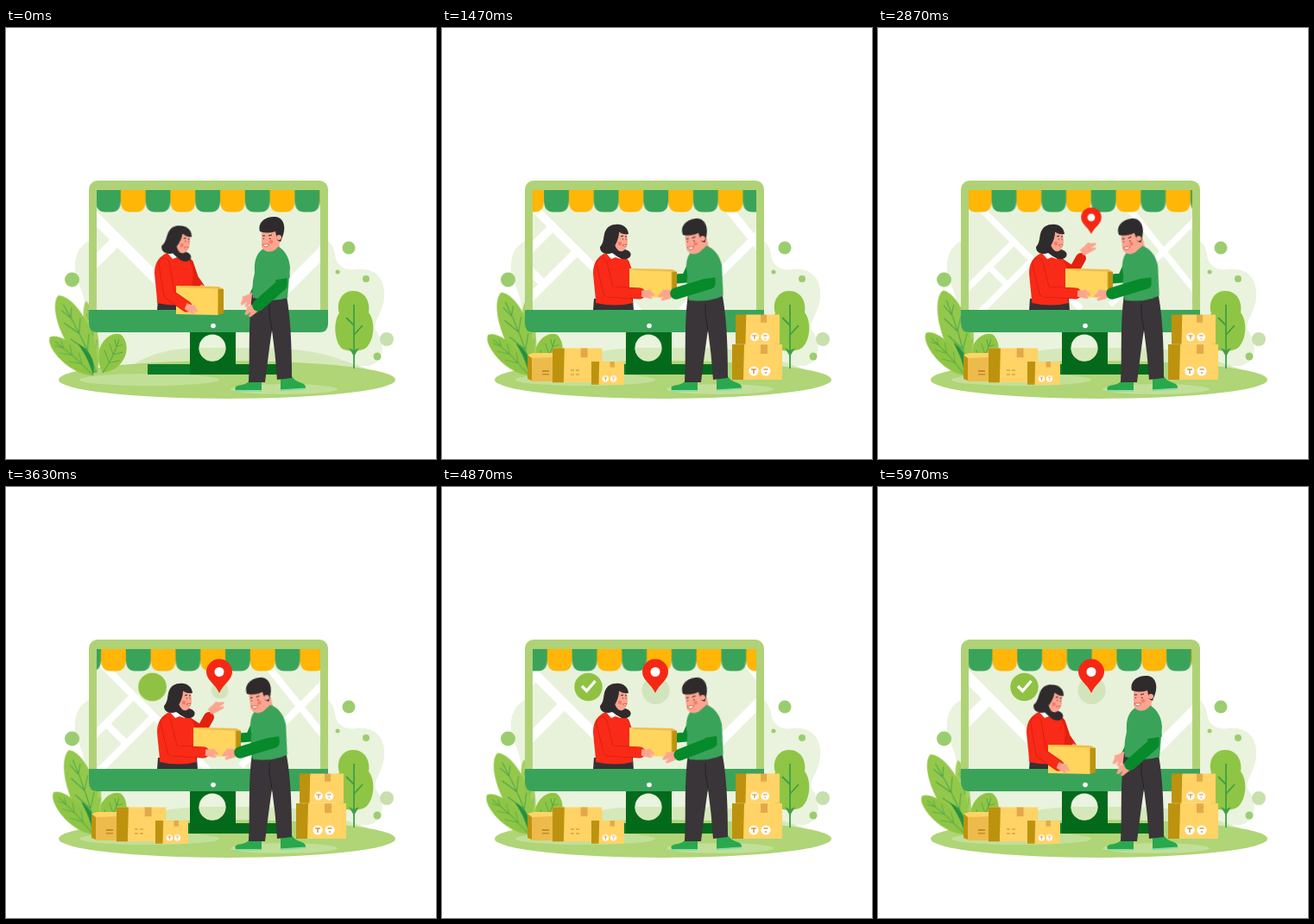
Recreate the animation shown at these times as an HTML page. Size 498 by 500 pixels, loop 6010 ms.

```html
<!DOCTYPE html>
<html lang="en">
<head>
<meta charset="utf-8">
<title>Parcel hand-over</title>
<style>
html, body { margin: 0; width: 100%; height: 100%; overflow: hidden; background: #fff; }
svg { display: block; width: 100%; height: 100%; }
.a { animation: 6010ms ease-in-out infinite; }
.pop { transform-box: fill-box; transform-origin: 50% 100%; }
.mid { transform-box: fill-box; transform-origin: 50% 50%; }
.arm { fill: none; stroke-linecap: round; stroke-linejoin: round; }

/* scenery */
@keyframes awning { to { transform: translateX(57.6px); } }
@keyframes zoom { 0%, 100% { transform: scale(1.7); } 46% { transform: scale(.96); } }
@keyframes swayTall { 0%, 100% { transform: rotate(0deg); } 46% { transform: rotate(9deg); } }
@keyframes swayLow { 0%, 100% { transform: rotate(0deg); } 48% { transform: rotate(6deg); } }

/* things that pop up */
@keyframes popA { 0%, 4% { transform: scale(0); } 10% { transform: scale(1.06); } 13%, 100% { transform: scale(1); } }
@keyframes popB { 0%, 8% { transform: scale(0); } 13.5% { transform: scale(1.07); } 16.5%, 100% { transform: scale(1); } }
@keyframes popC { 0%, 14% { transform: scale(0); } 19% { transform: scale(1.07); } 22%, 100% { transform: scale(1); } }
@keyframes popPin { 0%, 44% { transform: scale(0); } 50% { transform: scale(1.1); } 53%, 100% { transform: scale(1); } }
@keyframes popBadge { 0%, 53% { transform: scale(0); } 59% { transform: scale(1.05); } 61%, 100% { transform: scale(1); } }
@keyframes popShade { 0%, 53% { transform: scale(0); } 66%, 100% { transform: scale(1); } }
@keyframes tick { 0%, 62% { stroke-dashoffset: 26; } 68%, 100% { stroke-dashoffset: 0; } }

/* parcel and people */
@keyframes parcel { 0%, 2%, 98%, 100% { transform: none; } 14%, 83% { transform: translate(20.5px, -20px); } }
@keyframes womanBody { 0%, 2%, 98%, 100% { transform: none; } 12%, 83% { transform: translateX(3px); } }
@keyframes womanHead { 0%, 2%, 98%, 100% { transform: translate(-4px, 1px) rotate(8deg); } 12%, 83% { transform: rotate(0deg); } }
@keyframes manLean { 0%, 1%, 98%, 100% { transform: rotate(0deg); } 9%, 84% { transform: rotate(-7.5deg); } }
@keyframes manNod { 0%, 1%, 98%, 100% { transform: none; } 9%, 84% { transform: translate(-5px, 1px); } }

@keyframes wFront {
  0%, 2%, 98%, 100% { d: path("M183 273L189 309L209 323"); }
  14%, 83% { d: path("M185 273L193 306L229 308"); }
}
@keyframes wFrontHand {
  0%, 2%, 98%, 100% { transform: translate(209px, 323px) rotate(22deg) scale(-1, 1); }
  14%, 83% { transform: translate(232px, 308px) rotate(3deg) scale(-1, 1); }
}
@keyframes wBack {
  0%, 26%, 74%, 100% { d: path("M211 273L217 291L224 301"); }
  34%, 66% { d: path("M211 273L226 283L235 267"); }
}
@keyframes wBackHand {
  0%, 26%, 74%, 100% { transform: translate(225px, 301px) rotate(30deg) scale(-1, 1); }
  34%, 66% { transform: translate(237px, 260px) rotate(-36deg) scale(-1.3, 1.1); }
}
@keyframes mFront {
  0%, 13%, 90%, 100% { d: path("M319 284L319 298L292 322"); }
  21%, 77% { d: path("M309 283L310 296L271 308"); }
}
@keyframes mSleeve {
  0%, 1%, 98%, 100% { d: path("M317 268L320 291"); }
  10%, 82% { d: path("M308 268L311 290"); }
}
@keyframes mFrontHand {
  0%, 13%, 90%, 100% { transform: translate(291px, 323px) rotate(-30deg) scale(1.2); }
  21%, 77% { transform: translate(267px, 308px) rotate(-8deg) scale(1.2); }
}
@keyframes mBack {
  0%, 2%, 97%, 100% { d: path("M296 276L294 296L288 309"); }
  13%, 84% { d: path("M290 274L283 290L271 291"); }
}
@keyframes mBackHand {
  0%, 2%, 97%, 100% { transform: translate(286px, 311px) rotate(-32deg) scale(1.2); }
  13%, 84% { transform: translate(270px, 290px) rotate(22deg); }
}
</style>
</head>
<body>
<svg viewBox="0 0 498 500" preserveAspectRatio="none">
  <defs>
    <clipPath id="screen"><path d="M105 188H364V327H105Z"/></clipPath>
    <pattern id="stripes" patternUnits="userSpaceOnUse" x="104" y="188" width="57.6" height="27">
      <path fill="#3aa35a" d="M0 0H28.8V12Q28.8 25.5 18 25.5H10.8Q0 25.5 0 12Z"/>
      <path fill="#ffb606" d="M28.8 0H57.6V12Q57.6 25.5 46.8 25.5H39.6Q28.8 25.5 28.8 12Z"/>
    </pattern>
    <g id="leaf">
      <path d="M0 0C-34 -30 -27 -94 -5 -100C18 -92 29 -35 0 0Z"/>
      <path fill="none" stroke="#4aa551" stroke-width="1.3"
        d="M0 0Q3 -45 -4 -88M1 -28L-15 -48M1 -28L13 -45M0 -50L-14 -68M0 -50L11 -66M-2 -70L-10 -83M-2 -70L5 -81"/>
    </g>
    <g id="crate">
      <path fill="#ffd365" d="M0 0H58V41H0Z"/>
      <path fill="#bd920e" d="M0 0H14L13 41H0Z"/>
      <path fill="#e3a949" d="M33 0H41V11H33Z"/>
    </g>
    <g id="tags">
      <g fill="#fff"><circle cx="25" cy="31" r="5.6"/><circle cx="39" cy="31" r="5.6"/></g>
      <path fill="none" stroke="#c99a48" stroke-width="1.5" d="M22 29H28M25 29V34M36.500 29H41.500M39 32V34"/>
    </g>
    <path id="hand" fill="#fba48f" d="M1 -3.500L-5 -4L-9 -5L-10 -3L-14 0Q-15 2 -12 2L-8 1.500L-12 4Q-12 6 -9 5.500L-3 4.500L1 3.500Z"/>
  </defs>

  <!-- backdrop -->
  <path fill="#eaf3dd" d="M110 246C92 242 78 258 80 282C82 300 94 306 92 340L92 392H420C442 386 437 362 428 350C424 340 440 328 438 304C436 284 420 278 406 280C392 282 382 276 381 262C378 246 366 240 350 240Z"/>
  <path fill="#d5e8ba" d="M140 396C170 372 205 370 245 372C290 370 345 370 380 382L420 396Z"/>
  <ellipse cx="256" cy="408" rx="195" ry="22" fill="#afd576"/>
  <ellipse cx="166" cy="408" rx="81" ry="7" fill="#c2df98"/>
  <ellipse cx="322" cy="419" rx="62" ry="6" fill="#c2df98"/>
  <g fill="#9bcd70">
    <circle cx="76.500" cy="292" r="8.500"/><circle cx="397" cy="255" r="7.500"/>
    <circle cx="384" cy="283" r="2.500"/><circle cx="417" cy="291" r="4"/>
    <circle cx="441" cy="361" r="8" fill="#c8dfae"/><circle cx="430" cy="381" r="4.500"/>
  </g>

  <!-- tree -->
  <path fill="#8fc544" d="M402 305C416 305 422 318 420 330C428 340 427 362 417 371C410 376 394 376 388 371C379 360 380 338 386 331C382 318 389 305 402 305Z"/>
  <path fill="none" stroke="#3f9f48" stroke-width="1.8" d="M403 321V395M403 345L394 336M403 356L413 345"/>
  <path fill="#3f9f48" d="M397 371L403 374L409 371L403 381Z"/>

  <!-- plants -->
  <g transform="translate(112 400) rotate(30) scale(.75 .49)" fill="#8fc544"><use href="#leaf"/></g>
  <g transform="translate(106 398) rotate(-8)"><g class="a" style="animation-name:swayLow">
    <use href="#leaf" transform="scale(.36 .82)" fill="#a3d05c"/></g></g>
  <g transform="translate(105 400) rotate(-24)"><g class="a" style="animation-name:swayTall">
    <use href="#leaf" transform="scale(.78 1)" fill="#93c84a"/>
    <path fill="#23913f" d="M0 0C-9 -14 -22 -32 -28 -52C-24 -28 -14 -8 0 0Z"/></g></g>
  <g transform="translate(101 403) rotate(-46)"><g class="a" style="animation-name:swayLow">
    <use href="#leaf" transform="scale(.56 .67)" fill="#8fc544"/>
    <path fill="#23913f" d="M0 0C16 -10 18 -26 14 -38C11 -22 6 -10 0 0Z"/></g></g>

  <!-- monitor -->
  <path fill="#046a1b" d="M213 350H266V391H213Z"/>
  <path fill="#0a7a29" d="M164 390H314V402H164Z"/>
  <path fill="#046a1b" d="M213 390H314V402H213Z"/>
  <circle cx="239" cy="371" r="15.500" fill="#eaf3dd"/>
  <path fill="#d5e8ba" d="M223.500 371A15.500 15.500 0 0 0 254.500 371Z"/>
  <rect x="96" y="177" width="277" height="176" rx="10" fill="#afd276"/>
  <path fill="#e8f2da" d="M105 188H364V327H105Z"/>
  <g clip-path="url(#screen)">
    <g class="a" style="animation-name:zoom;transform-origin:243px 300px" fill="none" stroke="#fff" stroke-width="7.500">
      <path d="M40 132L235 327M154 246L40 360M176 268L90 354M124 276L148 300M280 190L385 321M330 262L420 172M336 256L270 322"/>
    </g>
    <rect class="a" style="animation-name:awning;animation-timing-function:linear" x="46.400" y="188" width="320" height="27" fill="url(#stripes)"/>
  </g>
  <circle class="a mid" style="animation-name:popShade" cx="247.500" cy="236" r="16" fill="#d2e4bb"/>
  <g class="a pop" style="animation-name:popPin">
    <path fill="#f52815" d="M247 239C242 228 232 224 232 214.500A15 15 0 0 1 262 214.500C262 224 252 228 247 239Z"/>
    <circle cx="247" cy="214.500" r="5.500" fill="#fff"/>
  </g>
  <circle class="a mid" style="animation-name:popBadge" cx="169.500" cy="232" r="16.200" fill="#8fc243"/>
  <path class="a" style="animation-name:tick" fill="none" stroke="#fff" stroke-width="3.400" stroke-dasharray="26 30" d="M162 231L167.500 236.500L177.500 225"/>

  <!-- woman -->
  <path class="a arm" style="animation-name:wBack" stroke="#e3210f" stroke-width="12"/>
  <g class="a" style="animation-name:wBackHand"><use href="#hand"/></g>
  <path fill="#353134" d="M176 314H221L222 328H175Z"/>
  <g class="a" style="animation-name:womanBody">
    <path fill="#f92a17" d="M187 261C178 264 172 272 172 284C173 298 175 310 175 319Q198 324 218 319C215 306 215 296 217 286C216 274 211 266 203 262Z"/>
    <path fill="#fba48f" d="M192 250L205 254L203 265L190 262Z"/>
    <path fill="#fff" d="M186 260L192 257L199 264L205 261L204 268L198 266L193 268Z"/>
  </g>
  <g class="a" style="animation-name:womanHead;transform-origin:200px 262px">
    <path fill="#2f2b2d" d="M207 236L190 236C186 243 188 249 183 254C183 262 191 263 197 261C202 264 206 269 214 268C220 266 220 260 215 258L207 255Z"/>
    <path fill="#fba48f" d="M202 235Q209 239 214 238L215 247C215 255 211 260 206 259Q201 257 199 248Z"/>
    <circle cx="206" cy="250" r="2.200" fill="#f8796a"/>
    <path fill="none" stroke="#2f2b2d" stroke-width="1" d="M207 242L210 241M212 242H214M209 245H210M212.500 245H213.500"/>
    <path fill="#fff" stroke="#c83a2c" stroke-width=".7" d="M209 252L214 251Q213 255 209 252Z"/>
    <path fill="#2f2b2d" d="M188 247C186 236 192 228 201 228C209 227 215 231 216 239Q209 240 205 236C205 244 202 250 198 256Q188 256 188 247Z"/>
  </g>
  <path fill="#3aa35a" d="M96 327H373V343Q373 353 363 353H106Q96 353 96 343Z"/>
  <circle cx="240" cy="345.500" r="2.800" fill="#fff"/>

  <!-- parcel between the two -->
  <path class="a arm" style="animation-name:mBack" stroke="#078a2b" stroke-width="11"/>
  <g class="a" style="animation-name:mBackHand"><use href="#hand"/></g>
  <g class="a" style="animation-name:parcel">
    <path fill="#ffd55e" d="M197 299L246 300L246 333L197 332Z"/>
    <path fill="#bd920e" d="M245.500 300L252 303V331L245.500 333Z"/>
    <path fill="#f0bd4c" d="M197 299L246 300L252 303L203 301Z"/>
  </g>
  <path class="a arm" style="animation-name:wFront" stroke="#c51c0f" stroke-width="13"/>
  <path class="a arm" style="animation-name:wFront" stroke="#f92a17" stroke-width="11.800"/>
  <g class="a" style="animation-name:wFrontHand"><use href="#hand"/></g>

  <!-- crates -->
  <g class="a pop" style="animation-name:popB">
    <path fill="#edbb4b" d="M104 380L129 379V410H104Z"/>
    <path fill="#bd920e" d="M99 379L104 381V409L99 407Z"/>
    <path fill="#ffd365" d="M99 379L106 377H129V382L104 383Z"/>
    <path fill="#c4892c" d="M116 397H124V399H116ZM116 401H124V402.500H116Z"/>
  </g>
  <g class="a pop" style="animation-name:popA">
    <use href="#crate" transform="translate(128 371.500) scale(.99 .97)"/>
    <path fill="none" stroke="#dba345" stroke-width="1.600" d="M149 397H153M155 397H159M149 402H153M155 402H159"/>
  </g>
  <g class="a pop" style="animation-name:popB">
    <g transform="translate(173 386.500) scale(.655)"><use href="#crate"/><use href="#tags"/></g>
  </g>
  <g class="a pop" style="animation-name:popB">
    <g transform="translate(336 367)"><use href="#crate"/><use href="#tags"/></g>
  </g>
  <g class="a pop" style="animation-name:popC">
    <g transform="translate(340 332.500) scale(.88 .84)"><use href="#crate"/><use href="#tags"/></g>
  </g>

  <!-- man -->
  <path fill="#2aa84d" d="M282 409L296 410L296 420H266Q263 415 273 414Q279 413 282 409Z"/>
  <path fill="#2aa84d" d="M318 405L331 404Q334 409 340 411Q348 413 347 418L318 420Z"/>
  <path fill="none" stroke="#8fdca5" stroke-width="2" d="M265 421H296M318 420.500L347 418.500"/>
  <path fill="#393538" d="M285 309L325 311C330 340 331 372 331 406L314 408Q312 378 308 350Q304 378 300 411L281 411C283 376 280 344 285 309Z"/>
  <path fill="none" stroke="#252225" d="M308 350Q304 334 305 320"/>
  <g class="a" style="animation-name:manLean;transform-origin:308px 314px">
    <path fill="#fba48f" d="M301 248L316 244L317 259L301 260Z"/>
    <path fill="#3aa35a" d="M300 255C290 260 287 270 288 284Q284 298 286 313Q308 319 326 313L329 278C328 264 321 256 314 253Q307 260 300 255Z"/>
    <g class="a" style="animation-name:manNod">
      <path fill="#fba48f" d="M296 233L315 233L319 244L315 254C309 262 298 261 296 253Z"/>
      <path fill="#2f2b2d" d="M294 236C291 226 300 218 312 219C322 220 324 231 321 240L318 248L314 246L312 236Q303 239 294 236Z"/>
      <circle cx="316" cy="243" r="3" fill="#fba48f"/>
      <circle cx="307" cy="248" r="2.300" fill="#f8796a"/>
      <path fill="none" stroke="#2f2b2d" stroke-width="1" d="M297 241H300M304 241L308 240M298 244.500H299M305 244.500H306.500"/>
      <path fill="#fff" stroke="#c83a2c" stroke-width=".7" d="M297 251L305 251Q301 257 297 251Z"/>
    </g>
  </g>
  <g class="a" style="animation-name:mFrontHand"><use href="#hand"/></g>
  <path class="a arm" style="animation-name:mFront" stroke="#078a2b" stroke-width="13.500"/>
  <path class="a arm" style="animation-name:mSleeve;stroke-linecap:butt" stroke="#3aa35a" stroke-width="18"/>
</svg>
</body>
</html>
```
